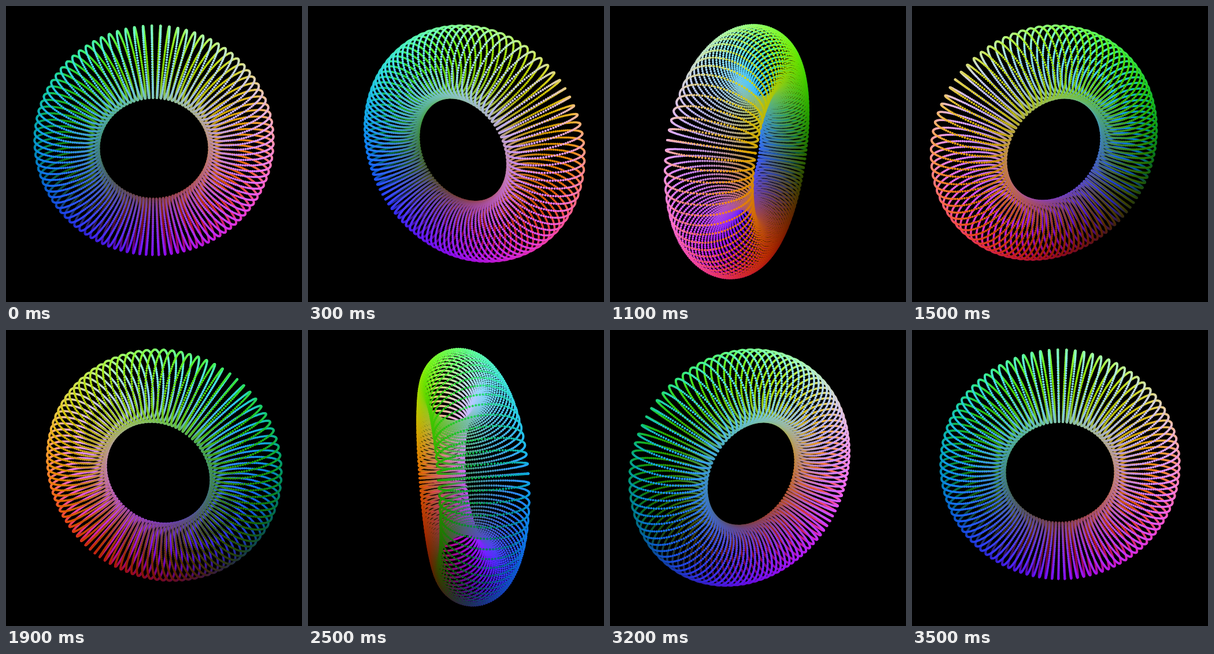
Recreate the animation shown at these times as an HTML page with a canvas. Size 512x512 px, loop 3600 ms.

```html
<!DOCTYPE html>
<html lang="en">
<head>
<meta charset="utf-8">
<title>Dotted torus</title>
<style>
  html, body { margin: 0; width: 100%; height: 100%; overflow: hidden; background: #000; }
  canvas { display: block; width: 512px; height: 512px; }
</style>
</head>
<body>
<canvas id="stage" width="512" height="512"></canvas>
<script>
const ctx = document.getElementById('stage').getContext('2d');
const SIZE = 512, MID = SIZE / 2, TAU = Math.PI * 2;
const MAJOR = 1, MINOR = 0.35, COUNT = 99;
const DIST = 3, TILT = Math.PI / 9;
const FOCAL = MID / Math.tan(Math.PI / 6);
const DOT = 2;
const STEP_MS = 100, STEPS = 36;

// Maps a coordinate in [-limit, limit] to a colour channel.
const channel = (value, limit) => Math.round(255 * (value / limit + 1) / 2);

function makeTorus() {
  const dots = [];
  const reach = MAJOR + MINOR;
  for (let i = 0; i < COUNT; i++) {
    const u = TAU * i / COUNT;
    for (let j = 0; j < COUNT; j++) {
      const v = TAU * j / COUNT;
      const ring = MAJOR + MINOR * Math.cos(v);
      const x = ring * Math.cos(u);
      const y = ring * Math.sin(u);
      const z = MINOR * Math.sin(v);
      const color = `rgb(${channel(x, reach)},${channel(y, reach)},${channel(z, MINOR)})`;
      dots.push({ x, y, z, color, sx: 0, sy: 0, depth: 0 });
    }
  }
  return dots;
}

const dots = makeTorus();
const cosTilt = Math.cos(TILT), sinTilt = Math.sin(TILT);

function project(dot, cosA, sinA) {
  const x = dot.x * cosA - dot.z * sinA;
  const near = dot.x * sinA + dot.z * cosA;
  const y = dot.y * cosTilt - near * sinTilt;
  dot.depth = DIST - dot.y * sinTilt - near * cosTilt;
  const scale = FOCAL / dot.depth;
  dot.sx = MID + x * scale;
  dot.sy = MID - y * scale;
}

function draw(step) {
  // First and last steps share the same pose.
  const angle = TAU * step / (STEPS - 1);
  const cosA = Math.cos(angle), sinA = Math.sin(angle);
  for (const dot of dots) project(dot, cosA, sinA);
  dots.sort((a, b) => b.depth - a.depth);

  ctx.fillStyle = '#000';
  ctx.fillRect(0, 0, SIZE, SIZE);
  for (const dot of dots) {
    ctx.fillStyle = dot.color;
    ctx.beginPath();
    ctx.arc(dot.sx, dot.sy, DOT, 0, TAU);
    ctx.fill();
  }
}

const start = performance.now();
let shown = -1;

function tick() {
  const elapsed = performance.now() - start;
  const step = Math.floor(elapsed / STEP_MS) % STEPS;
  if (step !== shown) {
    draw(step);
    shown = step;
  }
  requestAnimationFrame(tick);
}
tick();
</script>
</body>
</html>
```
